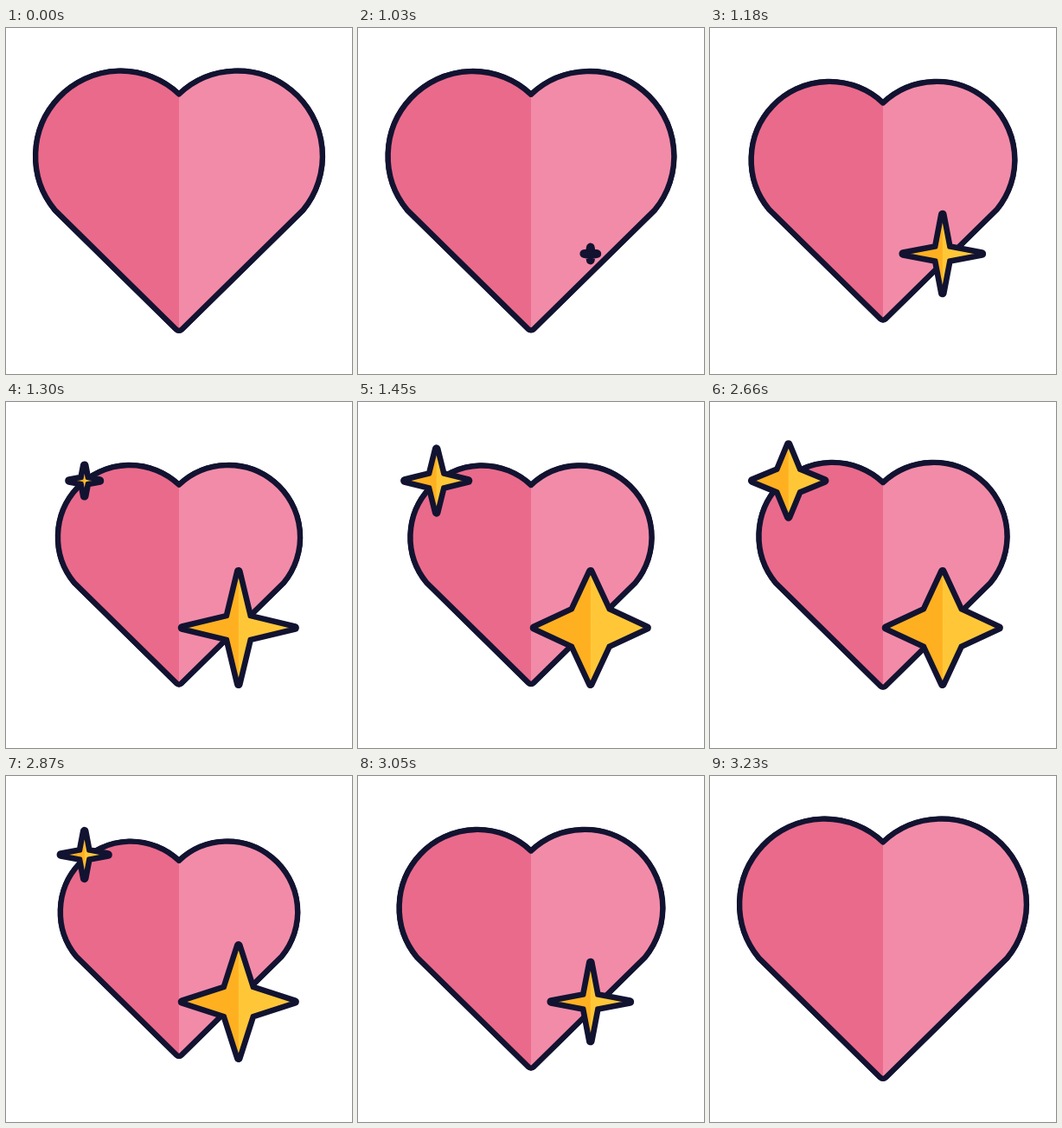
These frames come from a looping animation (400 by 400 pixels, 3260 ms). An HTML page with a canvas:

```html
<!DOCTYPE html>
<html lang="en">
<head>
<meta charset="utf-8">
<title>Sparkling heart</title>
<style>
  html, body { margin: 0; width: 100%; height: 100%; overflow: hidden; background: #fff; }
  canvas { display: block; width: 400px; height: 400px; }
</style>
</head>
<body>
<canvas id="stage"></canvas>
<script>
const LOOP = 3260, STEP = 30, STEPS = 20;
const INK = '#121331';

const canvas = document.getElementById('stage');
const ratio = window.devicePixelRatio || 1;
canvas.width = canvas.height = 400 * ratio;
const ctx = canvas.getContext('2d');
ctx.scale(ratio, ratio);
ctx.lineJoin = 'round';

const clamp = x => Math.min(1, Math.max(0, x));
const mix = (a, b, t) => a + (b - a) * t;
const progress = (k, from, to) => clamp((k - from) / (to - from));
const smooth = t => t * t * (3 - 2 * t);

function outline(path, width) {
  ctx.strokeStyle = INK;
  ctx.lineWidth = width;
  ctx.stroke(path);
}

// Fills a path in two tones split at x, with an outline reaching
// a given distance outside and inside the path.
function paint(path, x, left, right, outside, inside) {
  outline(path, 2 * outside);
  ctx.save();
  ctx.clip(path);
  ctx.fillStyle = right;
  ctx.fillRect(0, 0, 400, 400);
  ctx.fillStyle = left;
  ctx.fillRect(0, 0, x, 400);
  ctx.restore();
  outline(path, 2 * inside);
}

function drawHeart(scale) {
  const at = v => 200 + (v - 200) * scale;
  const radius = 98.3 * scale, cleft = 0.814, side = 0.69;
  const path = new Path2D();
  path.arc(at(132.5), at(148), radius, -cleft, Math.PI - side, true);
  path.arcTo(200, at(351.5), at(343.4), at(210.5), 4.5 * scale);
  path.arc(at(267.5), at(148), radius, side, Math.PI + cleft, true);
  path.closePath();
  paint(path, 200, '#ea6a8b', '#f28ba8', 3.3, 3.1);
}

function drawStar(x, y, outer, inner) {
  if (outer <= 0) return;
  const path = new Path2D();
  for (let i = 0; i < 8; i++) {
    const r = i % 2 ? inner * Math.SQRT2 : outer;
    const a = i * Math.PI / 4;
    path.lineTo(x + r * Math.cos(a), y + r * Math.sin(a));
  }
  path.closePath();
  paint(path, x, '#ffb021', '#ffc738', 4.8, 1.8);
}

// A star first shoots out thin, then swells to its full shape.
function sparkle(k, star) {
  const grow = progress(k, star.start, star.peak);
  const swell = progress(k, star.peak, star.end);
  drawStar(star.x, star.y,
    mix(star.thin * grow, star.outer, swell),
    mix(star.thin * grow * 0.16, star.inner, swell));
}

const bigStar = { x: 268.8, y: 261, start: 0, peak: 8.6, end: 15, thin: 65.3, outer: 65.3, inner: 20.7 };
const smallStar = { x: 90.7, y: 91, start: 6.3, peak: 13.6, end: 20, thin: 35, outer: 43.3, inner: 13.5 };

function heartScale(k) {
  const low = 0.826, turn = 12.5;
  return k < turn
    ? mix(1, low, smooth(k / turn))
    : mix(low, 0.871, progress(k, turn, STEPS));
}

// Step of the sparkle: forward, hold, then the same steps backward.
function stepAt(time) {
  const steps = from => Math.min(STEPS, Math.max(0, Math.floor((time - from) / STEP)));
  return steps(1000) - steps(2630);
}

let origin = null;
function frame(now) {
  origin ??= now;
  const k = stepAt((now - origin) % LOOP);
  ctx.fillStyle = '#fff';
  ctx.fillRect(0, 0, 400, 400);
  drawHeart(heartScale(k));
  sparkle(k, bigStar);
  sparkle(k, smallStar);
  requestAnimationFrame(frame);
}
requestAnimationFrame(frame);
</script>
</body>
</html>
```
